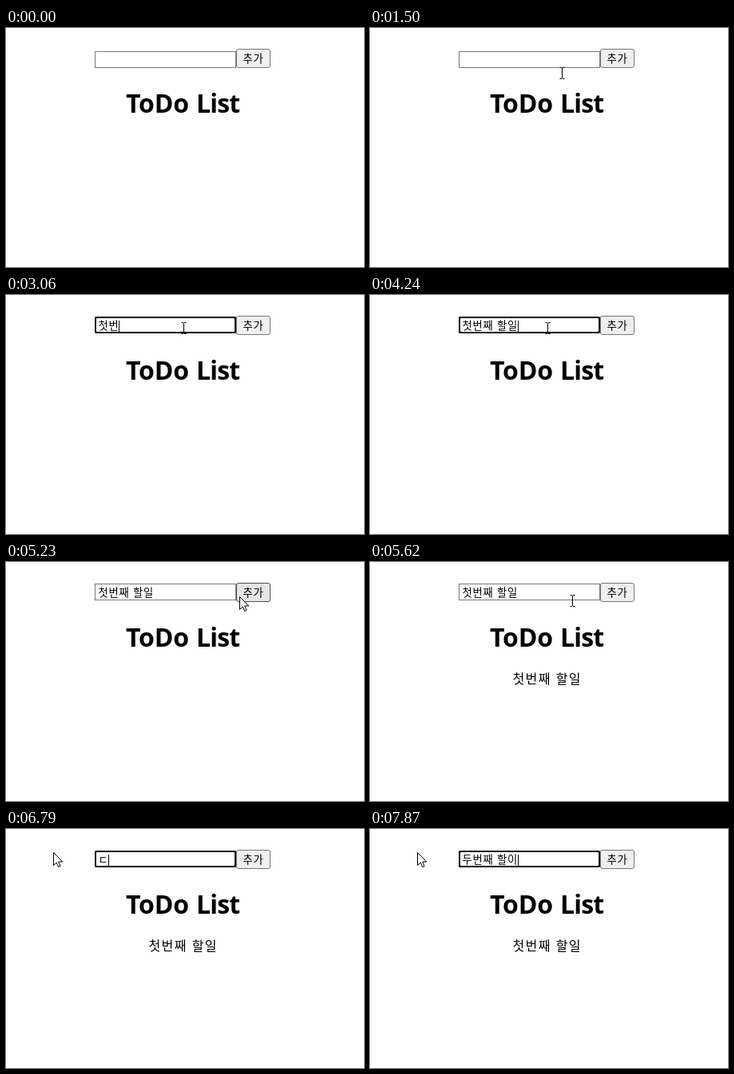
These frames come from a looping animation (448x299 px, 8000 ms). An HTML page:

```html
<!DOCTYPE html>
<html lang="ko">
<head>
<meta charset="utf-8">
<title>ToDo List</title>
<style>
  html, body { margin: 0; width: 100%; height: 100%; overflow: hidden; background: #fefefe; }
  svg { display: block; width: 100vw; height: 100vh; }
  text { font-family: "Noto Sans CJK KR", "Noto Sans CJK", sans-serif; font-weight: 350; white-space: pre; }
  .title { font: 700 32px "Open Sans", "Noto Sans", sans-serif; }
  .small { font-size: 13.33px; letter-spacing: .74px; }
  .item { font-size: 16px; letter-spacing: 1.4px; }
  .field { fill: #fff; stroke: #767676; }
  .ring { fill: none; stroke: #101010; stroke-width: 2; }
  .button { fill: #efefef; stroke: #767676; }
  .button.hover { fill: #e5e5e5; stroke: #4f4f4f; }
</style>
</head>
<body>
<svg viewBox="0 0 448 299">
  <clipPath id="selectedArea"><rect id="clip" y="29" height="17.5"/></clipPath>
  <g id="box">
    <rect class="field" x="111.5" y=".5" width="176" height="20"/>
    <rect id="ring" class="ring" x="112" y="1" width="175" height="19" rx="2"/>
  </g>
  <text id="value" class="small" x="115.5" y="43"></text>
  <path id="spelling" d="M116 46.5H155" stroke="#555" stroke-dasharray="2 1.5"/>
  <g id="selection" clip-path="url(#selectedArea)">
    <rect x="115" y="29" width="71" height="17.5" fill="#0078d7"/>
    <text id="selectedValue" class="small" x="115.5" y="43" fill="#fff"></text>
  </g>
  <rect id="caret" y="32" width="1"/>
  <rect id="button" class="button" x="288.5" y="26.5" width="42" height="23" rx="2.5"/>
  <text class="small" x="296.5" y="43">추가</text>
  <text class="title" x="150" y="106" letter-spacing="-.2">ToDo</text>
  <text class="title" x="238" y="106" letter-spacing="-.8">List</text>
  <text id="item" class="item" x="178.5" y="152">첫번째 할일</text>
  <path id="beam" d="M-3 -7H-.5M.5 -7H3M0 -6.5V6.5M-3 7H-.5M.5 7H3" fill="none" stroke="#000"/>
  <path id="arrow" d="M.5 .5V16.5L4.2 13 6.6 18.4 9 17.4 6.7 12H11.8Z" fill="#fff" stroke="#000"/>
</svg>
<script>
const LOOP = 8000, STEP = 98, BLINK = 500;
const el = Object.fromEntries([...document.querySelectorAll("[id]")].map(e => [e.id, e]));
const events = [];

const at = (time, change) => events.push({ time, change });

function type(start, ...values) {
  values.forEach((value, i) => at(start + i * STEP, {
    value, from: null, blinkStart: start + i * STEP,
    spelling: value.startsWith("첫번째 "),
  }));
}

function move(start, ...points) {
  points.forEach(([x, y, pointer = "beam"], i) => at(start + i * STEP, { x, y, pointer }));
}

// Click into the empty field
move(1500, [240, 56], [237, 69], [230, 58], [224, 46], [222, 42], [222, 41]);
at(1890, { focus: true, blinkStart: 1890 });

type(2570, "ㅊ", "처", "첫");
type(2960, "첫버", "첫번");
type(3250, "첫번ㅉ", "첫번째", "첫번째 ", "첫번째 ㅎ", "첫번째 하", "첫번째 할", "첫번째 할이");
type(4240, "첫번째 할일");

// Press the button
move(4540, [227, 42], [240, 45], [256, 48], [272, 48], [282, 47, "arrow"], [287, 46, "arrow"]);
move(5230, [292, 43, "arrow"], [292, 43, "arrow"], [286, 45, "arrow"], [268, 48], [253, 48], [250, 45]);
at(5230, { focus: false, spelling: false, hover: true });
at(5328, { item: true });
at(5426, { hover: false });

// Drag over the old value to replace it
at(5720, { focus: true, blinkStart: 5720 });
move(5910, [220, 48], [172, 55], [126, 51], [90, 43], [68, 38], [59, 29, "arrow"]);
at(6008, { from: 172 });
at(6106, { from: 128 });
at(6204, { from: 115 });

type(6790, "ㄷ", "두", "두버", "두번");
type(7280, "두번ㅉ", "두번째", "두번째 ", "두번째 ㅎ", "두번째 하", "두번째 할", "두번째 할이");

events.sort((a, b) => a.time - b.time);

const show = (e, on) => e.setAttribute("visibility", on ? "visible" : "hidden");
const place = (e, x, y) => e.setAttribute("transform", `translate(${x} ${y})`);
const textEnd = value => [...value].reduce((x, c) => x + (c === " " ? 5 : 13), 115);

function draw(t) {
  const s = { value: "", focus: false, from: null, pointer: null, x: 0, y: 0, blinkStart: 0 };
  for (const { time, change } of events) if (time <= t + 4) Object.assign(s, change);

  const selecting = s.from !== null;
  const blinkOn = Math.floor(Math.max(0, t + 10 - s.blinkStart) / BLINK) % 2 === 0;

  place(el.box, 0, s.value ? 27 : 29);
  show(el.ring, s.focus);
  el.value.textContent = el.selectedValue.textContent = s.value;
  show(el.spelling, s.spelling);

  show(el.selection, selecting);
  el.clip.setAttribute("x", s.from ?? 115);
  el.clip.setAttribute("width", selecting ? 186 - s.from : 0);

  show(el.caret, s.focus && !selecting && blinkOn);
  el.caret.setAttribute("x", textEnd(s.value));
  el.caret.setAttribute("height", s.value ? 14 : 15);

  el.button.classList.toggle("hover", !!s.hover);
  show(el.item, s.item);

  show(el.beam, s.pointer === "beam");
  show(el.arrow, s.pointer === "arrow");
  place(el.beam, s.x + .5, s.y + .5);
  place(el.arrow, s.x, s.y);
}

function frame() {
  draw(performance.now() % LOOP);
  requestAnimationFrame(frame);
}
frame();
</script>
</body>
</html>
```
